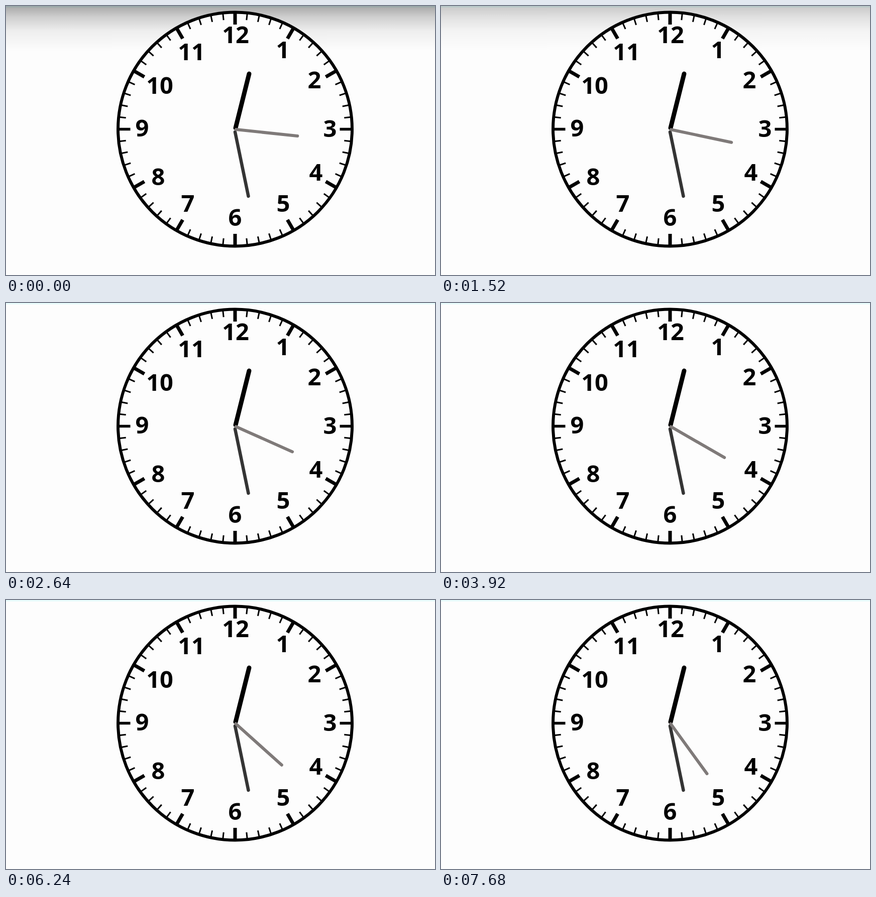
Write an HTML page that moves like this. It is 854 by 536 pixels and loops after 7760 ms.

```html
<!DOCTYPE html>
<html lang="en">
<head>
<meta charset="utf-8">
<title>Ticking clock</title>
<style>
  html, body { margin: 0; width: 100%; height: 100%; overflow: hidden; background: #fdfdfd; }
  svg { display: block; }
  text { font: bold 47px "Open Sans", "Noto Sans", sans-serif; text-anchor: middle; }
  line { stroke: #000; }
  .hand { stroke-linecap: round; }
</style>
</head>
<body>
<svg width="854" height="536" viewBox="0 0 854 536">
  <defs>
    <linearGradient id="fade" x2="0" y2="1">
      <stop offset="0" stop-opacity=".34"/>
      <stop offset=".25" stop-opacity=".18"/>
      <stop offset=".55" stop-opacity=".06"/>
      <stop offset="1" stop-opacity="0"/>
    </linearGradient>
  </defs>
  <rect width="854" height="536" fill="#fdfdfd"/>
  <rect width="854" height="3" fill="#e9fcfc"/>
  <rect id="shade" width="854" height="90" fill="url(#fade)"/>
  <circle cx="456" cy="245.5" r="233" fill="#fdfdfd" stroke="#000" stroke-width="6"/>
  <g id="dial"></g>
  <line class="hand" x1="457" y1="243" x2="484" y2="135" stroke-width="9"/>
  <line class="hand" x1="456" y1="251" x2="482.5" y2="379" stroke-width="6.5" style="stroke:#343434"/>
  <line class="hand" id="second" x1="458" y1="246" x2="581" y2="246" stroke-width="6" style="stroke:#7f7a79"/>
</svg>
<script>
const LOOP = 7760, FRAME = 80;
const $ = id => document.getElementById(id);

// Numeral centres, from 1 to 12
const numerals = [
  [551, 87], [614, 147], [645, 244], [617, 331], [552, 393], [456, 421],
  [362, 393], [303, 340], [271, 243], [306, 158], [369, 91], [457, 57]
];

let dial = '';
for (let i = 0; i < 60; i++) {
  const major = i % 5 === 0;
  const width = !major ? 3 : i % 30 === 15 ? 5.5 : 7;
  dial += `<line x1="456" x2="456" y1="13" y2="${major ? 37 : 27}" stroke-width="${width}" transform="rotate(${i * 6} 456 245.5)"/>`;
}
numerals.forEach(([x, y], i) => dial += `<text x="${x}" y="${y + 17}">${i + 1}</text>`);
$('dial').innerHTML = dial;

function draw(now) {
  const t = Math.floor(now % LOOP / FRAME) * FRAME;
  const ticks = Math.floor((t + 410) / 1000);
  $('second').setAttribute('transform', `rotate(${6 + 6 * ticks} 457 245.5)`);
  $('shade').setAttribute('opacity', Math.min(1, Math.max(0, (1600 - t) / 130)));
}

const start = performance.now();
(function loop() {
  draw(performance.now() - start);
  requestAnimationFrame(loop);
})();
</script>
</body>
</html>
```
